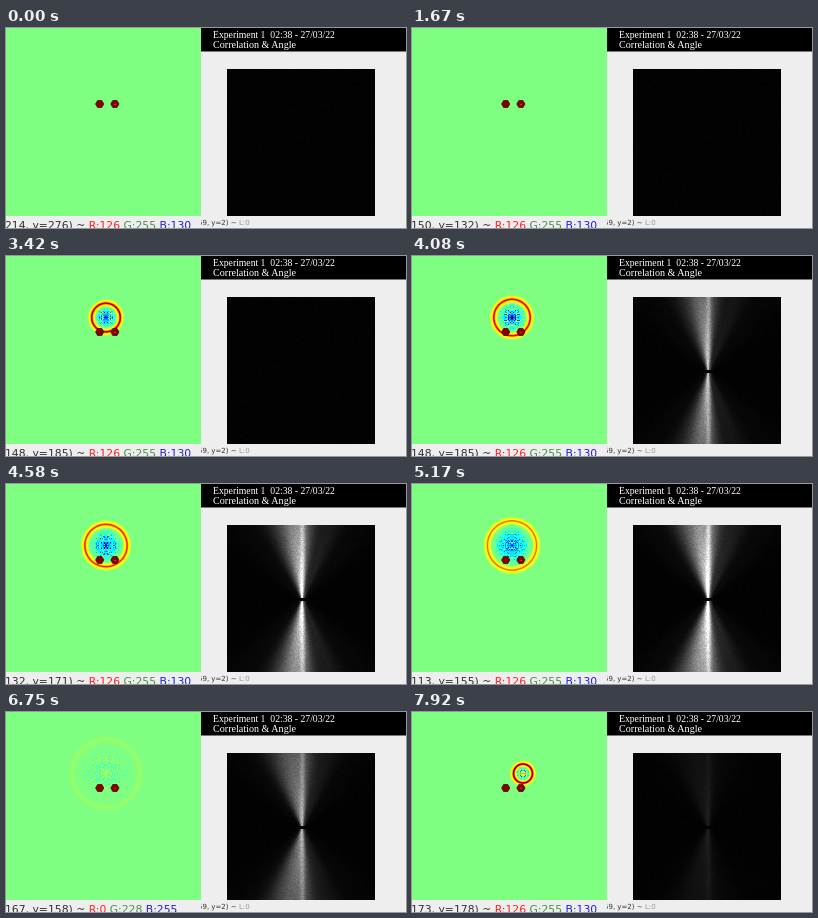
Animation of 400 by 200 pixels, one loop 8000 ms. Source, as an HTML page with a canvas:

```html
<!DOCTYPE html>
<html>
<head>
<meta charset="utf-8">
<style>
html, body { margin: 0; width: 400px; height: 200px; overflow: hidden; background: #eee; }
canvas, svg { position: absolute; left: 0; top: 0; }
#matrix { left: 221px; top: 41px; }
text { white-space: pre; }
.mono { font-family: "DejaVu Sans", sans-serif; fill: #333; }
.title { font-family: "Liberation Serif", serif; fill: #fff; }
</style>
</head>
<body>
<canvas id="wave" width="195" height="188"></canvas>
<canvas id="matrix" width="148" height="147"></canvas>
<svg width="400" height="200">
  <path d="M195 0h205v23.5h-205z"/>
  <text class="title" x="207" y="9.5" font-size="9.7">Experiment 1  02:38 - 27/03/22</text>
  <text class="title" x="207" y="19.8" font-size="10.1">Correlation &amp; Angle</text>
  <g fill="#860000" stroke="#4a0c00" stroke-width=".8">
    <path d="M89.6 76l2-3.5h4.2l2 3.5-2 3.5h-4.2z"/>
    <path d="M104.8 76l2-3.5h4.2l2 3.5-2 3.5h-4.2z"/>
  </g>
  <path d="M108 76.5h2" stroke="#e22"/>
  <text class="mono" x="-1" y="200.5" font-size="10.8"><tspan id="pos"></tspan><tspan id="red" fill="#f22"></tspan><tspan id="green" fill="#4a944a"></tspan><tspan id="blue" fill="#22d"></tspan></text>
  <svg x="195" y="188" width="205" height="12">
    <text class="mono" x="-3" y="9" font-size="7">59, y=2) ~ <tspan fill="#999">L:0</tspan></text>
  </svg>
</svg>
<script>
const LOOP = 8000, STEP = 1000 / 12;
const REST = [126, 255, 130], CYAN = [0, 228, 255];
const $ = id => document.getElementById(id);

// Pointer stops: time, x, y
const CURSOR = [
  [500, 214, 276], [1170, 160, 150], [1670, 150, 132], [2750, 148, 185],
  [4100, 148, 185], [5170, 113, 155], [6000, 163, 144], [7830, 173, 178]
];

function cursorAt(t) {
  const i = CURSOR.findIndex(k => k[0] > t);
  if (i < 1) return CURSOR.at(i).slice(1);
  const a = CURSOR[i - 1], b = CURSOR[i], p = (t - a[0]) / (b[0] - a[0]);
  return [1, 2].map(j => Math.round(a[j] + (b[j] - a[j]) * p));
}
function hash(x, y, s) {
  const v = Math.sin(x * 12.99 + y * 78.23 + s * 3.71) * 43758.55;
  return v - Math.floor(v);
}
const bell = v => Math.exp(-v * v);
const channel = v => 255 * Math.max(0, Math.min(1, v));
const jet = v => [3, 2, 1].map(c => channel(1.5 - Math.abs(2 * v + 2 - c)));

function paint(canvas, color) {
  const { width: w, height: h } = canvas, ctx = canvas.getContext('2d');
  const img = ctx.createImageData(w, h);
  for (let y = 0, i = 0; y < h; y++)
    for (let x = 0; x < w; x++, i += 4) {
      img.data.set(color(x, y), i);
      img.data[i + 3] = 255;
    }
  ctx.putImageData(img, 0, 0);
}

// A pulse spreads at constant speed and fades out at the end of its life.
function pulseAt(t) {
  const second = t > 7420, life = 4.8;
  const age = (t - (second ? 7420 : 2100)) / 1000;
  const radius = 6.5 + 5.9 * age;
  return {
    x: second ? 110.5 : 99.5, y: 61, radius, age,
    disc: radius * .62,
    height: age > 0 && age < life ? .93 * Math.cos(Math.PI / 2 * age / life) : 0,
    core: 1.8 * Math.exp(-age / 2) * Math.cos(1.2 * age + .49)
  };
}

function drawWave(pulse, step) {
  const { radius, disc, height, core, age } = pulse;
  const depth = .3 * Math.min(1, 2 * height), grain = .2 + .6 * height;
  paint($('wave'), (x, y) => {
    const dx = Math.abs(x - pulse.x), dy = Math.abs(y - pulse.y);
    const r = Math.hypot(dx, dy), edge = r - radius;
    if (!height || edge > 8) return REST;
    const body = Math.exp(-((r / disc) ** 4));
    const speck = (2 * hash(dx, dy, step) - 1) ** 3;
    const v = height * bell(edge / (2 + .25 * age)) * (.85 + .25 * Math.cos(edge * 2))
      + body * (grain * speck - depth) + core * bell(r / 2.5);
    return Math.abs(v) < .015 ? REST : jet(v);
  });
}

function drawMatrix(t, step) {
  const p = Math.max(0, (t - 3430) / 4700);
  const power = Math.sin(Math.PI * p ** .7), spread = .18 + .12 * p;
  paint($('matrix'), (x, y) => {
    const dx = x - 75, dy = y - 74;
    if (Math.abs(dy) < 2 && Math.abs(dx) < 4) return [0, 0, 0];
    const a = Math.atan2(dx, Math.abs(dy) + 2);
    const fan = .7 * bell((a + spread * .5) / spread)
      + .25 * bell(a / .5) * (.8 + .2 * Math.cos(a * 16));
    const fade = 1 - .35 * Math.hypot(dx, dy) / 75;
    const light = power * (fan * fade + .3 * bell(dx / 2.5));
    const g = channel(light * (.9 + .2 * hash(x, y, step)) + .015 * hash(x, y, 1));
    return [g, g, g];
  });
}

function drawText(t, pulse) {
  const [x, y] = cursorAt(t);
  const away = Math.hypot(x / 2 + 5 - pulse.x, y / 2 - 5 - pulse.y);
  const [r, g, b] = pulse.height && away < pulse.disc ? CYAN : REST;
  $('pos').textContent = `${x}, y=${y}) ~ `;
  $('red').textContent = `R:${r} `;
  $('green').textContent = `G:${g} `;
  $('blue').textContent = `B:${b}`;
}

let last = -1;
function frame(now) {
  const step = Math.floor((now % LOOP + 10) / STEP) % 96;
  if (step !== last) {
    const t = step * STEP, pulse = pulseAt(t);
    drawWave(pulse, step);
    drawMatrix(t, step);
    drawText(t, pulse);
    last = step;
  }
  requestAnimationFrame(frame);
}
frame(0);
</script>
</body>
</html>
```
